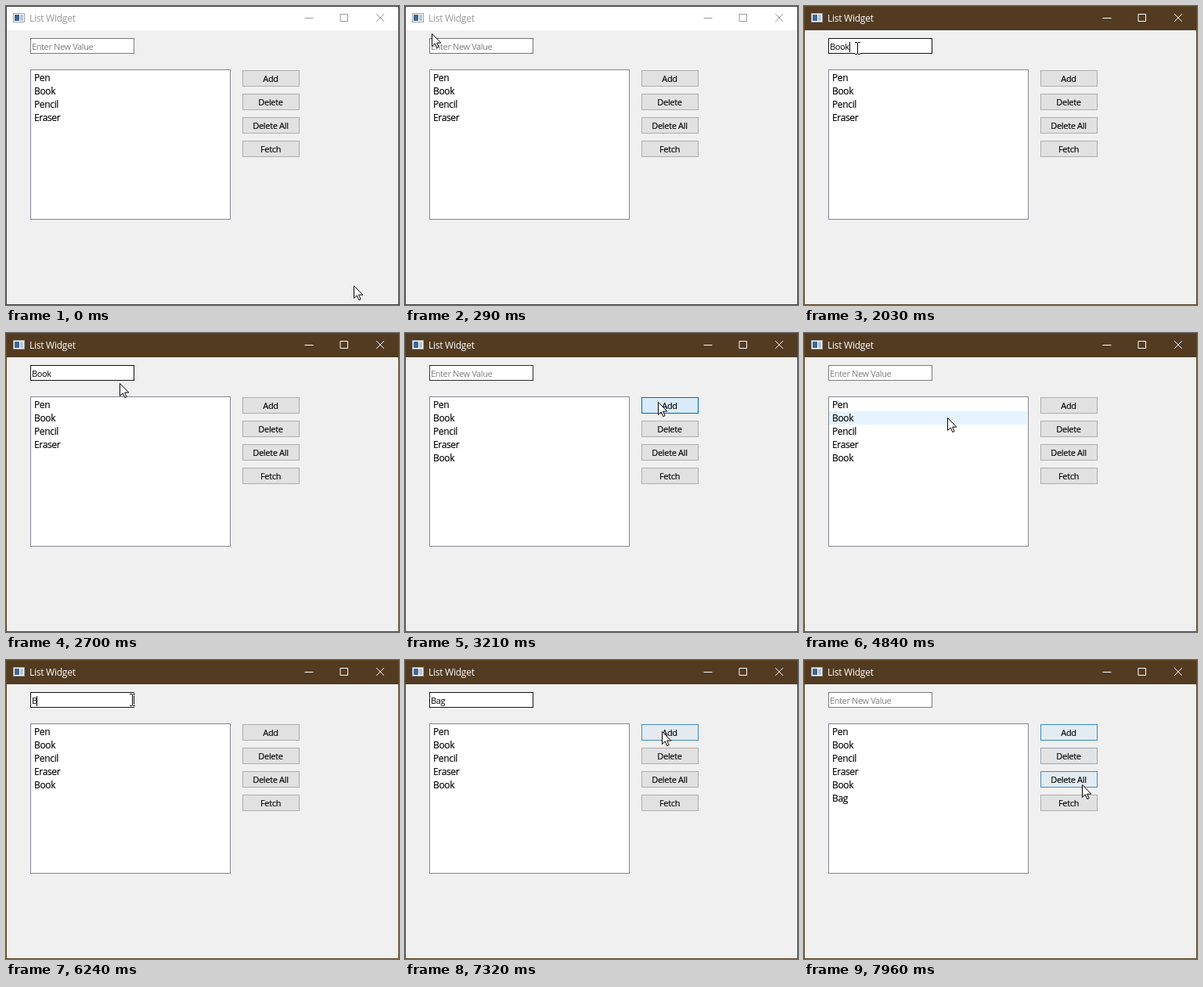
Recreate the animation shown at these times as an HTML page. Size 502 by 382 pixels, loop 7990 ms.

```html
<!DOCTYPE html>
<html lang="en">
<head>
<meta charset="utf-8">
<title>List Widget</title>
<style>
  html, body { margin: 0; width: 100%; height: 100%; overflow: hidden; }
  body { font: 11px/20px "Open Sans", "Noto Sans", sans-serif; letter-spacing: -.35px; color: #000; }
  #win { position: absolute; left: 0; top: 0; width: 502px; height: 382px; box-sizing: border-box;
         border: 1px solid #434343; background: #f0f0f0; overflow: hidden; }
  #win.active { border-color: #5f4522; }
  #win > * { position: absolute; box-sizing: border-box; white-space: nowrap; }
  #bar { left: -1px; top: 0; width: 502px; height: 30px; background: #fff; color: #999; }
  .active #bar { background: #523b21; color: #fff; }
  #bar b { position: absolute; left: 30px; top: -1px; font-weight: 400; font-size: 12px; line-height: 31px; letter-spacing: -.25px; }
  #bar svg { position: absolute; left: 0; top: -1px; }
  #field { left: 30px; top: 40px; width: 133px; height: 20px; border: 1px solid; background: #fff; }
  #field > * { position: absolute; left: 1px; top: 0; }
  #hint { color: #7f7f7f; letter-spacing: -.38px; }
  #caret { display: inline-block; width: 1px; height: 13px; margin-left: -.3px; vertical-align: -3px; background: #000; }
  #list { left: 30px; top: 80px; width: 256px; height: 192px; margin: 0; padding: 1px 1px 0 0;
          border: 1px solid #828790; background: #fff; list-style: none; font-size: 12px; line-height: 17px; }
  #list li { height: 17px; padding-left: 4px; }
  #list, .btn { -webkit-text-stroke: .15px #000; }
  .btn { left: 301px; width: 73px; height: 21px; padding-right: 1px; border: 1px solid; text-align: center;
         line-height: 19px; letter-spacing: -.32px; }
  #cur { left: -1px; top: -1px; width: 0; height: 0; }
  #cur svg { position: absolute; left: -10px; top: -10px; }
</style>
</head>
<body>
<div id="win">
  <div id="bar">
    <svg width="502" height="31" fill="none">
      <rect x="9.5" y="9.5" width="14" height="11" fill="#fff" stroke="#9aa2a8"/>
      <rect x="11" y="11" width="6" height="8" fill="#3f6690"/>
      <rect x="18" y="11" width="4" height="8" fill="#b5c4d2"/>
      <path d="M382 15.5h10M427.5 10.5h9v9h-9zM473.5 10.5l9 9M482.5 10.5l-9 9" stroke="currentColor" stroke-linecap="square"/>
    </svg>
    <b>List Widget</b>
  </div>
  <div id="field">
    <span id="hint">Enter New Value</span>
    <span><span id="text"></span><span id="caret"></span></span>
  </div>
  <ul id="list"><li>Pen</li><li>Book</li><li>Pencil</li><li>Eraser</li><li>Book</li><li>Bag</li></ul>
  <div class="btn" style="top:81px">Add</div>
  <div class="btn" style="top:111px">Delete</div>
  <div class="btn" style="top:141px">Delete All</div>
  <div class="btn" style="top:171px">Fetch</div>
  <div id="cur">
    <svg id="arrow" width="40" height="40" viewBox="-10 -10 40 40">
      <path d="M.5.5v16l3.7-3.6 2.6 5.7 2.3-1-2.5-5.5h5.2z" fill="#fff" stroke="#000"/>
    </svg>
    <svg id="beam" width="40" height="40" viewBox="-10 -10 40 40" fill="none">
      <path d="M-3-7.5h7M.5-8V8M-3 7.5h7" stroke="#fff" stroke-width="3"/>
      <path d="M-3-7.5h3M1-7.5h3M.5-7V7M-3 7.5h3M1 7.5h3" stroke="#000"/>
    </svg>
  </div>
</div>
<script>
const LOOP = 7990, STEP = 10, BLINK = 530;
const FADE_IN = STEP / 130, FADE_OUT = STEP / 400;
const $ = id => document.getElementById(id);
const rows = [...document.querySelectorAll("li")];
const buttons = [...document.querySelectorAll(".btn")];

// pointer strokes: start, end, and where it goes
const START = [444, 357];
const strokes = [
  [20, 290, 34, 35], [390, 560, 68, 54], [2500, 3050, 323, 88], [3310, 3680, 250, 211],
  [3830, 4080, 310, 124], [4080, 4150, 277, 125], [4150, 4620, 190, 128],
  [4640, 5250, 161, 51], [6940, 7350, 330, 92], [7740, 7960, 355, 159]
];

// each entry: click the field, type a word, press and release Add
const entries = [
  { word: "Book", focus: 590, keys: [1230, 1620, 1850, 2030], press: 3120, add: 3190 },
  { word: "Bag", focus: 5280, keys: [6240, 6400, 6500], press: 7520, add: 7600 }
];

const mix = (a, b, u) => a + (b - a) * u;
const ease = u => u * u * (3 - 2 * u);

function pointer(t) {
  let [x, y] = START;
  for (const [from, to, nx, ny] of strokes) {
    if (t <= from) break;
    const u = ease(Math.min(1, (t - from) / (to - from)));
    x = mix(x, nx, u);
    y = mix(y, ny, u);
  }
  return [Math.round(x), Math.round(y)];
}

const hitTest = el => {
  const r = el.getBoundingClientRect();
  return ([x, y]) => x >= r.left && x < r.right && y >= r.top && y < r.bottom;
};
const overField = hitTest($("field"));
const overRow = rows.map(hitTest);
const overButton = buttons.map(hitTest);

const pressed = t => entries.some(e => t >= e.press && t < e.add);
const focused = t => entries.some(e => t >= e.focus && t < e.press);

// levels fade toward 0 idle, 1 hover, 2 pressed
const fade = (level, goal) =>
  level < goal ? Math.min(goal, level + FADE_IN) : Math.max(goal, level - FADE_OUT);

const levels = [];
let now = { field: 0, buttons: buttons.map(() => 0) };
for (let t = 0; t < LOOP; t += STEP) {
  const p = pointer(t);
  now = {
    field: fade(now.field, overField(p) || focused(t) ? 1 : 0),
    buttons: now.buttons.map((k, i) => fade(k, overButton[i](p) ? (pressed(t) ? 2 : 1) : 0))
  };
  levels.push(now);
}

const FILL = [[225, 225, 225], [229, 241, 251], [204, 228, 247]];
const EDGE = [[173, 173, 173], [0, 120, 215], [0, 84, 153]];
const FRAME = [[122, 122, 122], [17, 17, 17]];
function shade(set, level) {
  const i = Math.min(set.length - 2, Math.floor(level));
  return `rgb(${set[i].map((c, n) => Math.round(mix(c, set[i + 1][n], level - i)))})`;
}
const show = (el, on) => { el.style.visibility = on ? "visible" : "hidden"; };

function draw(t) {
  const p = pointer(t), level = levels[Math.floor(t / STEP)];
  $("win").classList.toggle("active", t >= entries[0].focus);

  const inField = overField(p);
  $("cur").style.transform = `translate(${p[0]}px,${p[1]}px)`;
  show($("beam"), inField);
  show($("arrow"), !inField);

  const entry = entries.find(e => t >= e.focus && t < e.add);
  const typed = entry ? entry.keys.filter(k => k <= t) : [];
  const lastInput = entry ? Math.max(entry.focus, ...typed) : 0;
  $("text").textContent = entry ? entry.word.slice(0, typed.length) : "";
  show($("hint"), !typed.length);
  show($("caret"), focused(t) && (t - lastInput) % (2 * BLINK) < BLINK);
  $("field").style.borderColor = shade(FRAME, level.field);

  const count = rows.length - entries.filter(e => t < e.add).length;
  rows.forEach((row, i) => {
    show(row, i < count);
    row.style.background = overRow[i](p) ? "#e5f3ff" : "";
  });
  buttons.forEach((b, i) => {
    b.style.background = shade(FILL, level.buttons[i]);
    b.style.borderColor = shade(EDGE, level.buttons[i]);
  });
}

const begin = performance.now();
function tick() {
  draw((performance.now() - begin) % LOOP);
  requestAnimationFrame(tick);
}
tick();
</script>
</body>
</html>
```
